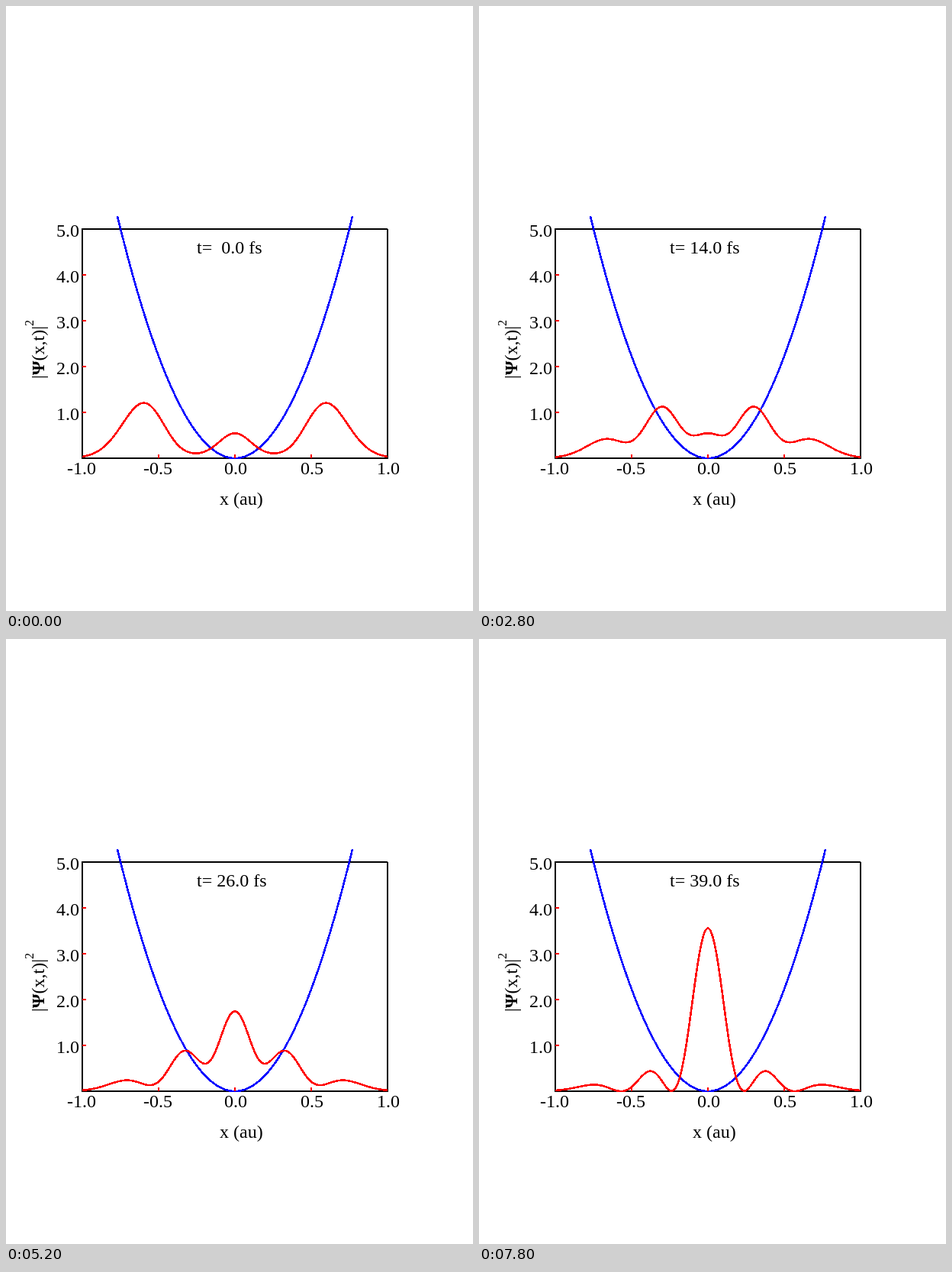
These frames come from a looping animation (612 px wide and 792 px high, 8000 ms). An HTML page:

```html
<!DOCTYPE html>
<html lang="en">
<head>
<meta charset="utf-8">
<title>Harmonic oscillator wave packet</title>
<style>
  html, body { margin: 0; width: 100%; height: 100%; overflow: hidden; background: #fff; }
  svg { display: block; width: 612px; height: 792px; }
  text { font: 24px "Liberation Serif", serif; white-space: pre; }
  path { fill: none; stroke-width: 2; shape-rendering: crispEdges; }
  .curve { stroke-width: 2.6; stroke-linejoin: round; }
</style>
</head>
<body>
<svg viewBox="0 0 612 792">
  <path stroke="#000" d="M500 292V592H100V292H500"/>
  <path id="potential" class="curve" stroke="#00f"/>
  <path id="ticks" stroke="#f00"/>
  <path id="density" class="curve" stroke="#f00"/>
  <g id="labels"></g>
  <text x="280" y="653">x (au)</text>
  <text transform="translate(50 488) rotate(-90)">|<tspan font-weight="bold" style="font-weight:bold">Ψ</tspan>(x,t)|<tspan dy="-14" style="font-size:16px">2</tspan></text>
  <text id="clock" x="250" y="324"></text>
</svg>
<script>
const STEP_MS = 200, STEPS = 40;
const BETA = 3.53;    // sqrt(mass * omega), atomic units
const OMEGA2 = 0.566; // phase gap between neighbouring even levels, rad per fs

const byId = id => document.getElementById(id);
const px = x => 300 + 200 * x;
const py = y => 592 - 60 * y;

function plot(f, xMax) {
  const points = [];
  const n = 400;
  for (let i = 0; i <= n; i++) {
    const x = xMax * (2 * i / n - 1);
    points.push(px(x).toFixed(2) + " " + py(f(x)).toFixed(2));
  }
  return "M" + points.join("L");
}

// |psi|^2 for an equal mix of oscillator levels 0, 2 and 4
function densityAt(fs) {
  const c1 = Math.cos(OMEGA2 * fs), c2 = Math.cos(2 * OMEGA2 * fs);
  return x => {
    const q = (BETA * x) ** 2;
    const h2 = (4 * q - 2) / Math.sqrt(8);
    const h4 = (16 * q * q - 48 * q + 12) / Math.sqrt(384);
    const mix = 1 + h2 * h2 + h4 * h4 + 2 * (h2 + h2 * h4) * c1 + 2 * h4 * c2;
    return BETA / Math.sqrt(Math.PI) * Math.exp(-q) * mix / 3;
  };
}

function addLabel(x, y, value) {
  const label = document.createElementNS("http://www.w3.org/2000/svg", "text");
  label.setAttribute("x", x);
  label.setAttribute("y", y);
  label.textContent = value.toFixed(1);
  byId("labels").append(label);
}

let ticks = "";
for (let y = 1; y <= 5; y++) {
  addLabel(66, py(y) + 10, y);
  if (y < 5) ticks += `M100 ${py(y)}h5`;
}
for (let x = -1; x <= 1; x += 0.5) {
  addLabel(px(x) - (x < 0 ? 20 : 14), 613, x);
  if (Math.abs(x) < 1) ticks += `M${px(x)} 592v-5`;
}
byId("ticks").setAttribute("d", ticks);
byId("potential").setAttribute("d", plot(x => 8.91 * x * x, 0.77));

let shown = -1;
function draw(now) {
  const fs = Math.floor(now / STEP_MS) % STEPS;
  if (fs !== shown) {
    shown = fs;
    byId("density").setAttribute("d", plot(densityAt(fs), 1));
    byId("clock").textContent = "t= " + fs.toFixed(1).padStart(4) + " fs";
  }
  requestAnimationFrame(() => draw(performance.now() - start));
}
const start = performance.now();
draw(0);
</script>
</body>
</html>
```
